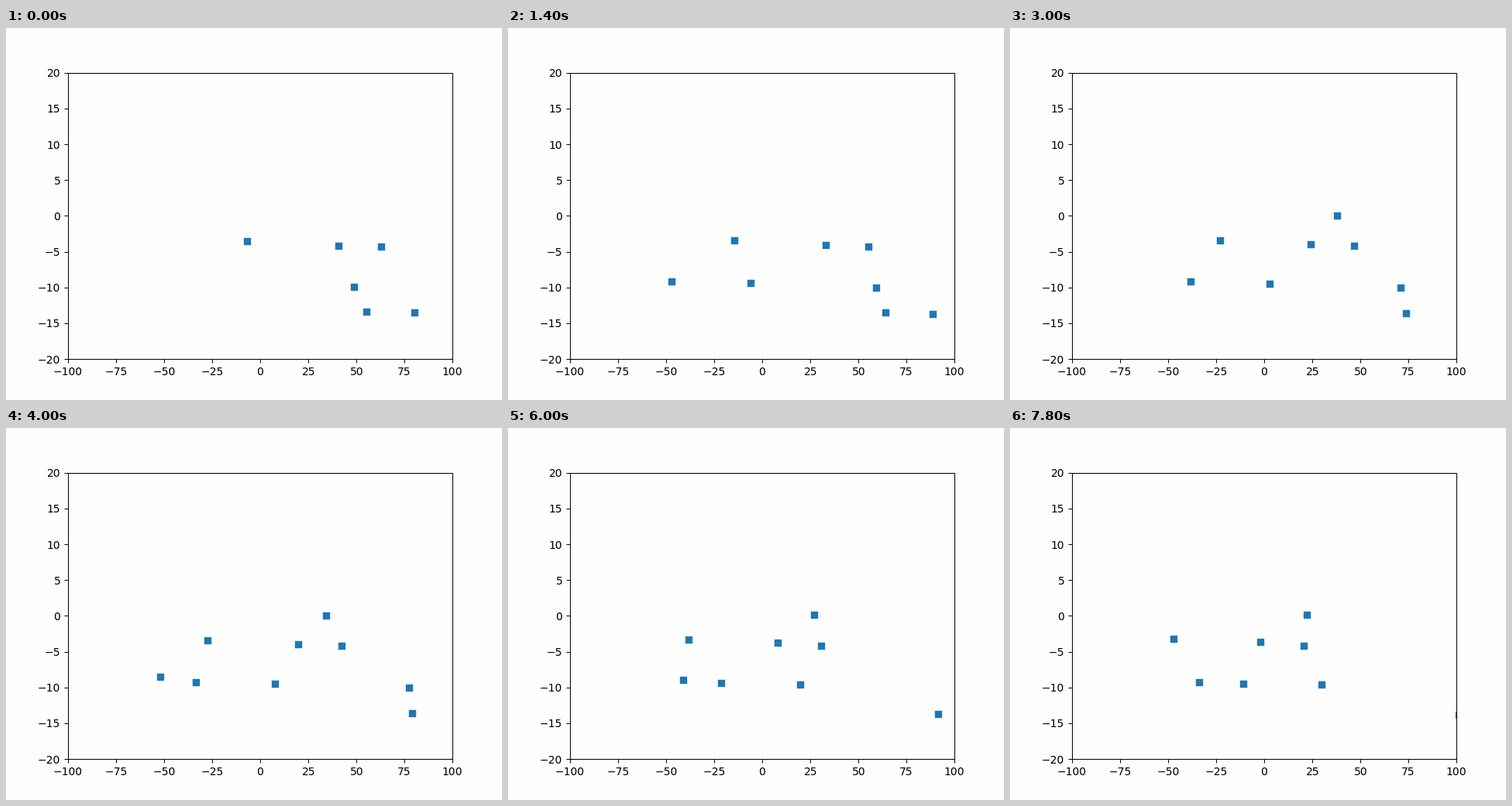
An HTML page with a canvas that plays this animation: 640x480 px, repeating every 8 s.

```html
<!DOCTYPE html>
<html lang="en">
<head>
<meta charset="utf-8">
<title>Moving points</title>
<style>
  html, body { margin: 0; width: 100%; height: 100%; overflow: hidden; background: #fefefe; }
  canvas { display: block; }
</style>
</head>
<body>
<canvas id="plot" width="640" height="480"></canvas>
<script>
const canvas = document.getElementById('plot');
const ctx = canvas.getContext('2d');
const STEP = 200, STEPS = 40;
const LEFT = 80, RIGHT = 576, TOP = 57.6, BOTTOM = 427.2;
const FONT_SIZE = 100 / 7.2;

const snap = v => Math.floor(v + 0.5) + 0.5;
const lerp = (a, b, k) => a + (b - a) * k;
const isHalf = v => Math.abs(v - Math.floor(v) - 0.5) < 1e-6;
const roundEven = v => isHalf(v) ? 2 * Math.round(v / 2) : Math.round(v);
const font = size => `${size}px "DejaVu Sans", sans-serif`;

// Steps of life, start and end of the path, and how far x leads an even pace midway.
const point = (first, last, [x1, y1], [x2, y2], lead = 0) =>
  ({ first, last, x1, y1, x2, y2, lead });

const points = [
  point(0, 39, [310.7, 274.9], [210.7, 272.2], -1.3),
  point(0, 39, [428.7, 281.3], [323, 276.3]),
  point(0, 39, [484.2, 281.7], [379, 280.8], 0.3),
  point(0, 27, [449, 334.3], [547.5, 335.4]),
  point(0, 39, [465, 366.4], [579, 370.4], 3.2),
  point(0, 12, [527, 367], [563, 370]),
  point(4, 39, [304, 328.7], [402, 331.3], 0.7),
  point(7, 39, [211, 326.6], [301, 329.8]),
  point(14, 39, [424, 242.3], [383, 240.8], -3.2),
  point(19, 39, [196, 320.5], [244, 327.8], 3.5)
];

// The whole scene slows for a while, then catches up.
const clock = step => step - Math.exp(-(((step - 22) / 5) ** 2));

function drawPoint(p, step) {
  if (step < p.first || step > p.last) return;
  const start = clock(p.first);
  const k = (clock(step) - start) / (clock(p.last) - start);
  const x = Math.round(lerp(p.x1, p.x2, k) + p.lead * 4 * k * (1 - k));
  const y = Math.round(lerp(p.y1, p.y2, k));
  ctx.fillRect(x - 4.195, y - 4.195, 9.39, 9.39);
}

function line(c, x1, y1, x2, y2) {
  c.beginPath();
  c.moveTo(x1, y1);
  c.lineTo(x2, y2);
  c.stroke();
}

// Space left of a glyph's ink, to an eighth of a pixel; measured large for precision.
function bearing(c, glyph) {
  c.font = font(FONT_SIZE * 100);
  const space = -c.measureText(glyph).actualBoundingBoxLeft / 100;
  c.font = font(FONT_SIZE);
  return Math.round(space * 8) / 8;
}

// align: 1 puts the text's right end at x, 0.5 its middle.
// The ink starts on a whole pixel, and the glyphs after the first are pulled left to match.
function label(c, value, x, baseline, align) {
  const text = String(value).replace('-', '\u2212');
  const head = text[0], space = bearing(c, head);
  const ink = Math.round(x - c.measureText(text).width * align + space);
  c.fillText(head, ink - Math.floor(space), baseline);
  c.fillText(text.slice(1), ink - Math.ceil(space) + c.measureText(head).width, baseline);
}

function makeAxes() {
  const layer = document.createElement('canvas');
  layer.width = canvas.width;
  layer.height = canvas.height;
  const c = layer.getContext('2d');
  const x0 = snap(LEFT), y0 = snap(BOTTOM);
  c.strokeRect(x0, snap(TOP), snap(RIGHT) - x0, y0 - snap(TOP));
  for (let i = 0; i <= 8; i++) {
    const x = lerp(LEFT, RIGHT, i / 8), y = lerp(BOTTOM, TOP, i / 8);
    line(c, snap(x), y0, snap(x), y0 + 5);
    line(c, x0, snap(y), x0 - 5, snap(y));
    label(c, -100 + 25 * i, x, 448, 0.5);
    label(c, -20 + 5 * i, 70.28, roundEven(y + 5.5), 1);
  }
  return layer;
}

const axes = makeAxes();

function draw(time) {
  const step = Math.floor(time / STEP) % STEPS;
  ctx.fillStyle = '#fefefe';
  ctx.fillRect(0, 0, canvas.width, canvas.height);
  ctx.save();
  ctx.beginPath();
  ctx.rect(LEFT, 58, RIGHT - LEFT, 369);
  ctx.clip();
  ctx.fillStyle = '#1f77b4';
  points.forEach(p => drawPoint(p, step));
  ctx.restore();
  ctx.drawImage(axes, 0, 0);
}

const start = performance.now();
function frame() {
  draw(performance.now() - start);
  requestAnimationFrame(frame);
}
frame();
</script>
</body>
</html>
```
